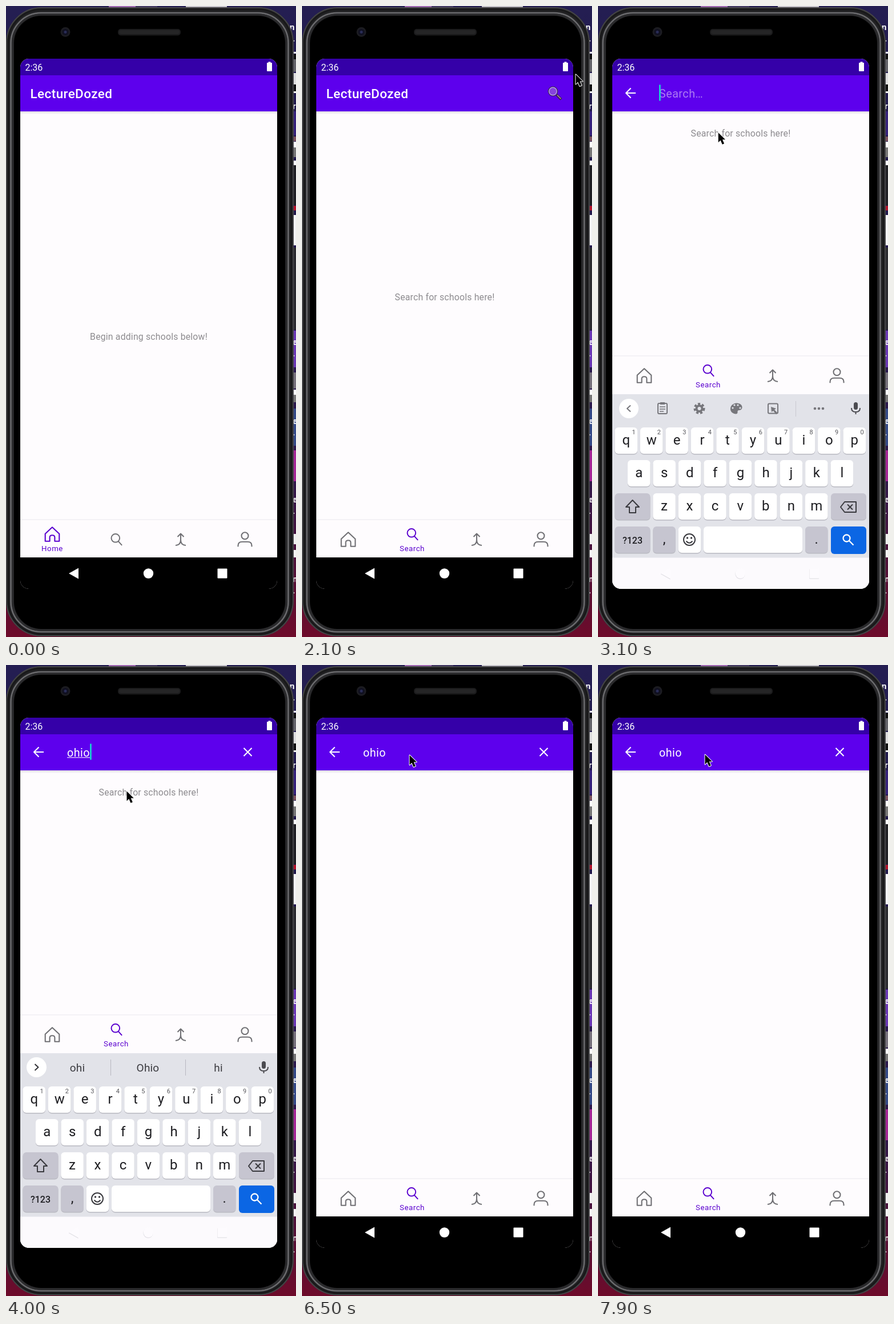
Recreate the animation shown at these times as an HTML page with a canvas. Size 508 by 1102 pixels, loop 8000 ms.

```html
<!DOCTYPE html>
<html lang="en">
<head>
<meta charset="utf-8">
<title>School search</title>
<style>
html, body { margin: 0; width: 100%; height: 100%; overflow: hidden; background: #000; }
canvas { display: block; }
</style>
</head>
<body>
<canvas id="stage" width="508" height="1102"></canvas>
<script>
const ctx = document.getElementById('stage').getContext('2d');
const LOOP = 8000, TAB_TAP = 1500, OPEN = 2300, SUBMIT = 4100;
const PURPLE = '#5a00cf', GRAY = '#707074';

const clamp = v => Math.max(0, Math.min(1, v));
const ramp = (t, a, b) => clamp((t - a) / (b - a));
const smooth = p => p * p * (3 - 2 * p);

function rect(x, y, w, h, fill, r = 0) {
  ctx.fillStyle = fill;
  ctx.beginPath();
  ctx.roundRect(x, y, w, h, r);
  ctx.fill();
}
function ring(x, y, w, h, r, color, width) {
  ctx.strokeStyle = color;
  ctx.lineWidth = width;
  ctx.beginPath();
  ctx.roundRect(x, y, w, h, r);
  ctx.stroke();
}
function disc(x, y, r, fill) {
  ctx.fillStyle = fill;
  ctx.beginPath();
  ctx.arc(x, y, r, 0, 7);
  ctx.fill();
}
function line(d, color, width = 2, x = 0, y = 0) {
  ctx.save();
  ctx.translate(x, y);
  ctx.strokeStyle = color;
  ctx.lineWidth = width;
  ctx.stroke(new Path2D(d));
  ctx.restore();
}
function shape(d, color, x = 0, y = 0) {
  ctx.save();
  ctx.translate(x, y);
  ctx.fillStyle = color;
  ctx.fill(new Path2D(d));
  ctx.restore();
}
function text(s, x, y, size, color, { weight = 400, align = 'left', gap = 0 } = {}) {
  ctx.font = `${weight} ${size}px Roboto, sans-serif`;
  ctx.letterSpacing = gap + 'px';
  ctx.textAlign = align;
  ctx.fillStyle = color;
  ctx.fillText(s, x, y);
}
function vertical(y0, y1, ...colors) {
  const g = ctx.createLinearGradient(0, y0, 0, y1);
  colors.forEach((c, i) => g.addColorStop(i / (colors.length - 1), c));
  return g;
}

// Sliver of desktop visible beside the phone: [top, height, colour]
const SLIVER = [
  [80, 3, '#fff'], [84, 9, '#111'], [93, 22, '#65656a'], [117, 20, '#ddd'], [137, 12, '#111'],
  [149, 3, '#fff'], [184, 42, '#37227c'], [228, 8, '#7d5360'], [237, 10, '#fff'], [247, 17, '#777'],
  [270, 8, '#fff'], [278, 70, '#202024'], [349, 8, '#b3152b'], [365, 53, '#f4f4f6'],
  [422, 143, '#2c2c30'], [567, 64, '#6a38b4'], [640, 28, '#77727c'], [670, 9, '#fff'],
  [679, 13, '#777'], [703, 65, '#354a87'], [776, 54, '#a52796'], [922, 18, '#eee'], [950, 13, '#f4f4f4']
];
const SCRAPS = [[42, 'n'], [62, '.'], [180, 'r'], [592, 'e'], [612, '.'], [730, 'e'], [750, '.'],
  [867, 'e'], [887, '.'], [1006, 'n'], [1026, '.']];

function drawPhone() {
  rect(0, 0, 508, 1102, vertical(0, 1102, '#241e52', '#211a4b', '#271a4f', '#30194b', '#6d0b2a'));
  rect(180, 0, 47, 3, '#a36bb5');
  rect(227, 0, 38, 3, '#453b65');
  rect(315, 0, 72, 4, '#c9c7cd');
  for (const [y, h, color] of SLIVER) rect(503, y, 5, h, color);
  for (const [y, s] of SCRAPS) text(s, y < 50 ? 497 : 502, y, 15, '#fff', { weight: 700 });

  rect(0, 2, 504, 1099, '#222224', 62);
  ring(1, 3, 502, 1097, 61, '#454547', 2);
  ring(4, 6, 496, 1091, 58, '#19191a', 3);
  ring(8.5, 12, 486, 1081, 53, '#6c6c6f', 2.5);
  ring(11.5, 15, 480, 1075, 50, '#2b2b2d', 3);
  rect(14, 17, 475, 1071, '#000', 48);

  disc(104, 45.5, 8.5, '#1c1c21');
  disc(104, 45.5, 5.5, '#101020');
  disc(104, 45.5, 2.5, '#292c56');
  rect(196, 40, 110, 11.5, '#1b1b1c', 5);
  rect(198, 42, 106, 7, '#252526', 3);
}

const lens = (x, y, color) => {
  line('M7.3 0A7.3 7.3 0 1 1 -7.3 0A7.3 7.3 0 1 1 7.3 0M5 5.5L11.3 12.6', color, 2, x, y);
};
const TABS = [
  { x: 81, label: 'Home', draw: c => line('M-12.3 -.8L0 -12.2L12.3 -.8V12.3H4.4V5.5Q4.4 1.8 0 1.8T-4.4 5.5V12.3H-12.3Z', c, 2.1) },
  { x: 193, label: 'Search', draw: c => lens(-1.2, -2.2, c) },
  { x: 306, label: '', draw: c => line('M0 -10V1C0 7 -3 10 -9 10.5M0 1C0 7 3 10 9 10.5M-5.5 -4.5L0 -10L5.5 -4.5', c, 2.1) },
  { x: 418.5, label: '', draw: c => line('M6 -6.2A6 6 0 1 1 -6 -6.2A6 6 0 1 1 6 -6.2M-12 12.8V11Q-12 4.2 -5 4.2H5Q12 4.2 12 11V12.8', c, 2.1) }
];

function drawTabs(t, shift) {
  const search = smooth(ramp(t, TAB_TAP, TAB_TAP + 150));
  rect(25, 896 - shift, 450, 2, '#f4f2f6');
  TABS.forEach((tab, i) => {
    const on = [1 - search, search, 0, 0][i];
    ctx.save();
    ctx.translate(tab.x, 931.5 - shift - 9 * on);
    tab.draw(on > .5 ? PURPLE : GRAY);
    ctx.restore();
    ctx.globalAlpha = on;
    text(tab.label, tab.x, 952 - shift, 13.3, PURPLE, { align: 'center', gap: .5 });
    ctx.globalAlpha = 1;
  });
}

function typedText(t) {
  return 'ohio'.slice(0, [3150, 3400, 3600, 3850].filter(at => t >= at).length);
}
// Caret toggles at these times, starting visible
function caretOn(t) {
  const flips = [2800, 3100, 4600, 5100, 5600, 6100, 6450, 6800, 7200, 7600, 7850];
  return flips.filter(at => t >= at).length % 2 === 0;
}

function drawHeader(t) {
  rect(25, 92, 450, 29, '#3500a8');
  rect(25, 184, 450, 5, vertical(184, 189, '#dedbe2', '#fefcfe'));
  rect(25, 121, 450, 63, '#5d00ed');
  text('2:36', 33.5, 112.5, 16, '#fff');
  rect(457, 99, 9, 15, '#fff', 1);
  rect(459.5, 97.5, 4, 2, '#fff');

  if (t < OPEN) {
    text('LectureDozed', 42.5, 161, 22.5, '#fff', { weight: 500, gap: .4 });
    if (t >= TAB_TAP) {
      line('M446 155L454 163', '#33263a', 4.5);
      line('M447 155.500L453.500 162', '#9a7199', 2);
      disc(439.5, 149, 8.8, '#40245f');
      disc(439.5, 149, 7.5, '#b59be6');
      disc(439.5, 149, 6, '#8642dc');
    }
    return;
  }
  line('M66 152H49.500M57.500 143.500L49 152L57.500 160.500', '#fff', 2.1);
  const typed = typedText(t);
  let caretX = 107;
  if (typed) {
    text(typed, 107, 160, 19.7, '#fff', { gap: .5 });
    caretX += ctx.measureText(typed).width;
    if (t < SUBMIT) rect(107, 161, caretX - 107, 1.2, '#e3d2fc');
    line('M416.500 145L430.500 159M430.500 145L416.500 159', '#fff', 2.1);
  } else {
    text('Search…', 107, 160, 19.7, '#ad7af4', { gap: .5 });
  }
  if (caretOn(t)) rect(caretX, 137.5, 2.7, 28, '#16d5cf');
}

function key(label, x, y, w, special) {
  rect(x, y + 1.5, w, 46, '#babac2', 6);
  rect(x, y, w, 46, special ? '#c6c5d0' : '#fff', 6);
  if (label) text(label, x + w / 2, y + 30, label.length > 1 ? 16 : 24, '#1d1d21',
    { align: 'center', weight: label.length > 1 ? 500 : 400 });
}

function drawToolbar() {
  disc(54, 703, 17, '#fff');
  line('M57 697.500L51 703L57 708.500', '#77777c', 2);
  const c = '#77777c';
  ring(105, 694, 16, 18, 2, c, 2);
  rect(109, 692, 8, 4, c);
  line('M108 700H118M108 704H118M108 708H115', c, 1.7);
  ctx.setLineDash([4, 3]);
  line('M8 0A8 8 0 1 1 -8 0A8 8 0 1 1 8 0', c, 4, 177.5, 703);
  ctx.setLineDash([]);
  line('M5 0A5 5 0 1 1 -5 0A5 5 0 1 1 5 0', c, 4, 177.5, 703);
  shape('M1 -9.500C13 -9 13 3 5 3C0 3 5 9 0 9.500C-14 9 -13 -9 1 -9.500Z', c, 242, 703);
  for (const [x, y] of [[236, 702], [239, 697], [245, 697], [249, 702]]) disc(x, y, 1.6, '#e2e3e9');
  ring(298, 694.5, 17, 17, 2, c, 2);
  shape('M303 700L312 703L309 705L315 711L312 713L307 707L304 709Z', c);
  rect(346, 690, 1, 27, '#c8c8cf');
  for (const x of [380, 387, 394]) disc(x, 703, 2.3, c);
}

function drawSuggestions(typed) {
  disc(53.5, 702.5, 17.5, '#fff');
  line('M50.500 697L56.500 702.500L50.500 708', '#333338', 2);
  const words = { o: ['o', 'of', 'on'], oh: ['oh', 'Oh', 'on'] }[typed] || ['ohi', 'Ohio', 'hi'];
  words.forEach((w, i) => text(w, [125, 248.5, 372][i], 710, 19, '#3a3a3f', { align: 'center', gap: .2 }));
  rect(183, 689, 1, 28, '#b8b8c0');
  rect(314, 689, 1, 28, '#b8b8c0');
}

function drawKeyboard(typed, offset, alpha) {
  ctx.save();
  ctx.translate(0, offset);
  ctx.globalAlpha = alpha;
  rect(25, 678, 450, 340, '#e2e3e9');
  typed ? drawSuggestions(typed) : drawToolbar();
  rect(448, 692, 7, 13, '#4b4b50', 3.5);
  line('M444 702Q444 709 451.500 709T459 702M451.500 709V713', '#4b4b50', 2);

  const PITCH = 44.45;
  [...'qwertyuiop'].forEach((c, i) => {
    key(c, 29.5 + i * PITCH, 736, 39.5);
    text((i + 1) % 10, 62.5 + i * PITCH, 747.5, 11, '#55555a', { align: 'center' });
  });
  [...'asdfghjkl'].forEach((c, i) => key(c, 52 + i * PITCH, 793, 39.5));
  [...'zxcvbnm'].forEach((c, i) => key(c, 96.3 + i * PITCH, 851, 39.5));
  key('', 29.5, 851, 62, true);
  line('M60.500 863L72 875H66V885H55V875H49Z', '#3a3a3f', 2);
  key('', 408, 851, 62, true);
  line('M425 875L432 866H452V884H432ZM437 870.500L446 879.500M446 870.500L437 879.500', '#3a3a3f', 2);

  key('?123', 29.5, 909, 62, true);
  key(',', 96.3, 909, 39.5, true);
  key('', 140.7, 909, 39.5);
  line('M10 0A10 10 0 1 1 -10 0A10 10 0 1 1 10 0M-5.500 2.500Q0 9 5.500 2.500', '#3a3a3f', 2, 160, 932);
  disc(156.5, 929, 1.7, '#3a3a3f');
  disc(163.5, 929, 1.7, '#3a3a3f');
  key('', 185, 909, 173);
  key('.', 363, 909, 39.5, true);
  rect(408, 909, 62, 48, '#0b66e4', 6);
  line('M6 0A6 6 0 1 1 -6 0A6 6 0 1 1 6 0M4.300 4.300L12 12', '#fff', 2.3, 435.5, 929.5);
  rect(25, 963.5, 450, 60, '#fcfafd');
  ctx.restore();
}

function systemIcons(color, dx = 0, dy = 0) {
  shape('M110 991L127 981.500V1000.500Z', color, dx, dy);
  disc(249.5 + dx, 991 + dy, 8.7, color);
  rect(370.5 + dx, 982.5 + dy, 17, 17, color, 1);
}

function drawScreen(t) {
  const resized = t >= 2450 && t < 4250;
  const shift = resized ? 286 : 0;
  ctx.save();
  ctx.beginPath();
  ctx.roundRect(25, 92, 450, 926, 15);
  ctx.clip();
  rect(25, 92, 450, 926, '#fefcfe');
  drawHeader(t);

  const message = t < TAB_TAP ? 'Begin adding schools below!' : t < SUBMIT ? 'Search for schools here!' : '';
  const messageY = t < TAB_TAP ? 583 : resized ? 228 : 514;
  text(message, 250, messageY, 15.8, '#8d8b8f', { align: 'center', gap: .2 });
  drawTabs(t, shift);

  let barAlpha = 1;
  if (t >= 2500 && t < 4400) {
    const rise = ramp(t, 2500, 2900), fall = ramp(t, SUBMIT, 4400);
    const offset = 340 * (Math.pow(1 - rise, 1.22) + fall * fall);
    drawKeyboard(typedText(t), offset, Math.min(1, .25 + rise * .9) * (1 - fall * .5));
    barAlpha = .62 * (1 - ramp(t, 2710, 2800)) + ramp(t, SUBMIT, 4300);
  }
  rect(25, 963, 450, 56, `rgba(0,0,0,${clamp(barAlpha)})`);
  if (barAlpha < .1) systemIcons('#deddE2', -.4, 1);
  systemIcons(barAlpha < .1 ? '#fdfbfe' : '#fff');
  ctx.restore();
}

// Pointer stops: [time, x, y]
const POINTER = [[1100, 515, 1000], [1450, 195, 932], [1600, 196, 930], [2000, 474, 180], [2100, 479, 119],
  [2280, 442, 151], [2380, 440, 152], [2650, 210, 221], [4000, 211, 220], [6100, 211, 220],
  [6500, 188, 157], [7100, 187, 156], [LOOP, 187, 156]];

function drawPointer(t) {
  const next = POINTER.findIndex(p => t < p[0]);
  if (next < 1) return;
  const [t0, x0, y0] = POINTER[next - 1], [t1, x1, y1] = POINTER[next];
  const p = smooth(ramp(t, t0, t1));
  const x = x0 + (x1 - x0) * p, y = y0 + (y1 - y0) * p;
  const arrow = 'M.500 .500V17.500L4.300 13.800L7.500 21L10.800 19.500L7.700 12.600H12.800Z';
  line(arrow, '#fff', 2, x, y);
  shape(arrow, '#000', x, y);
}

function frame(now) {
  const t = now % LOOP;
  ctx.lineJoin = 'round';
  drawPhone();
  drawScreen(t);
  drawPointer(t);
  requestAnimationFrame(() => frame(performance.now() - start));
}
const start = performance.now();
frame(0);
</script>
</body>
</html>
```
